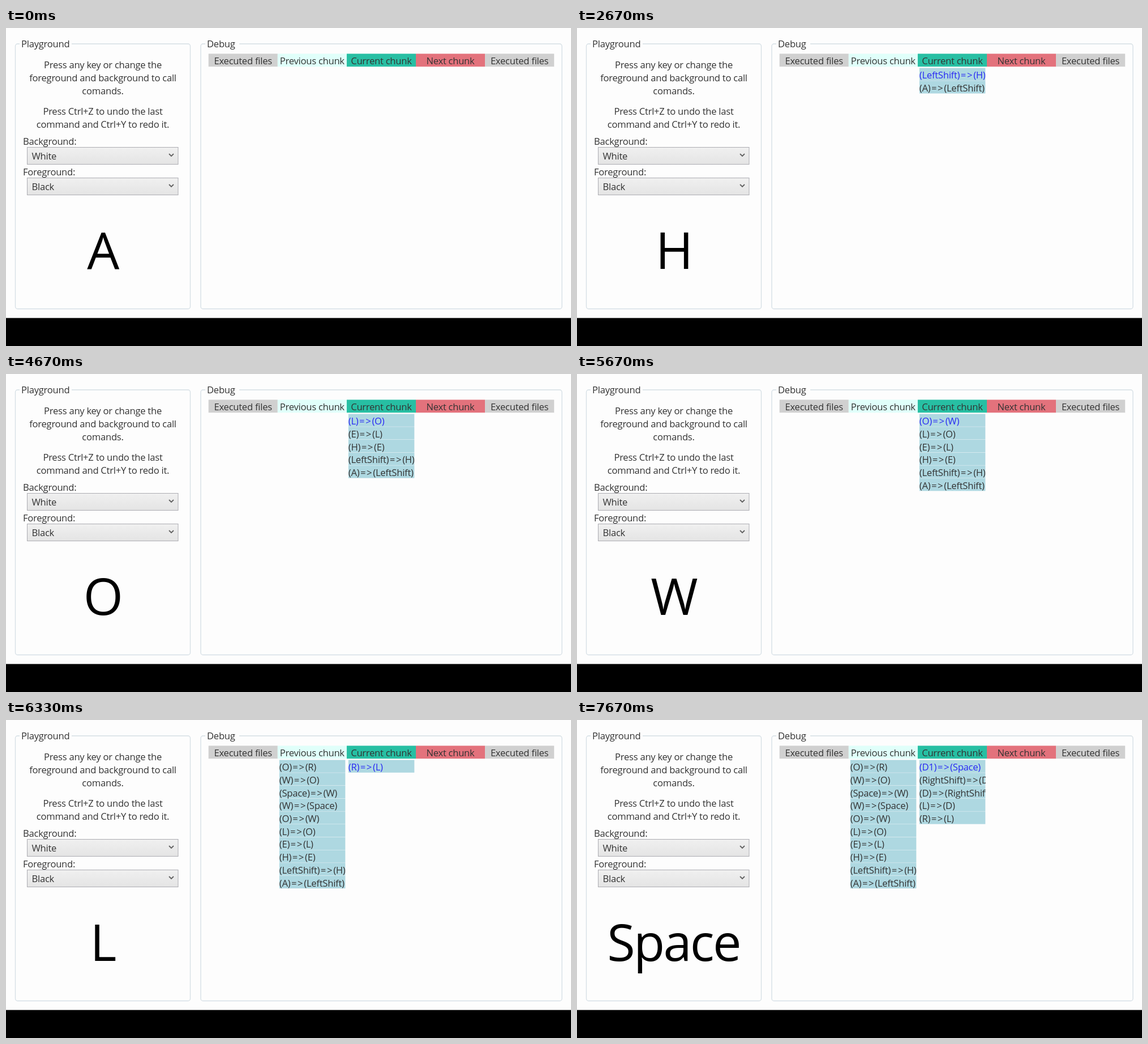
Recreate the animation shown at these times as an HTML page. Size 998 px wide and 561 px high, loop 8000 ms.

```html
<!DOCTYPE html>
<html lang="en">
<head>
<meta charset="utf-8">
<title>Command playground</title>
<style>
  html, body { margin: 0; width: 100%; height: 100%; overflow: hidden; background: #fdfdfd; }
  svg { display: block; width: 100%; height: 100%; }
  text {
    font: 16.6px "Open Sans", "Noto Sans", sans-serif;
    letter-spacing: -.015em;
    fill: #333;
  }
  .mid { text-anchor: middle; }
  .frame { fill: none; stroke: #d5dfe5; stroke-width: 1.3; }
  .gap { fill: #fdfdfd; }
  .combo { fill: url(#face); stroke: #acacb2; }
  .arrow { fill: none; stroke: #606060; stroke-width: 1.8; }
  .row { fill: #aed8e1; }
  .newest { fill: #2828f4; }
  .arrowText { letter-spacing: 1.7px; }
  #key { font-size: 90px; letter-spacing: -.03em; fill: #000; }
</style>
</head>
<body>
<svg viewBox="0 0 998 561">
  <defs>
    <linearGradient id="face" x2="0" y2="1">
      <stop stop-color="#f0f0f0"/>
      <stop offset="1" stop-color="#e4e4e4"/>
    </linearGradient>
    <clipPath id="previousClip"><rect x="482" y="68" width="118" height="420"/></clipPath>
    <clipPath id="currentClip"><rect x="604" y="68" width="118" height="420"/></clipPath>
    <clipPath id="keyClip"><rect x="22" y="320" width="298" height="160"/></clipPath>
  </defs>

  <rect width="998" height="561" fill="#fdfdfd"/>
  <rect class="frame" x="16.5" y="28" width="309" height="467.5" rx="4"/>
  <rect class="frame" x="344" y="28" width="638" height="467.5" rx="4"/>
  <rect class="gap" x="24" y="20" width="92" height="16"/>
  <rect class="gap" x="352" y="20" width="60" height="16"/>
  <text x="27" y="34">Playground</text>
  <text x="355" y="34">Debug</text>

  <g class="mid">
    <text x="171" y="71">Press any key or change the</text>
    <text x="171" y="94">foreground and background to call</text>
    <text x="171" y="116.5">comands.</text>
    <text x="171" y="153">Press Ctrl+Z to undo the last</text>
    <text x="171" y="176">command and Ctrl+Y to redo it.</text>
  </g>

  <text x="30" y="205.5">Background:</text>
  <rect class="combo" x="37.5" y="210.5" width="266.5" height="30"/>
  <text x="45.5" y="232">White</text>
  <path class="arrow" d="M288 222l4 4 4-4"/>

  <text x="30" y="259.5">Foreground:</text>
  <rect class="combo" x="37.5" y="264.5" width="266.5" height="30"/>
  <text x="45.5" y="286">Black</text>
  <path class="arrow" d="M288 276l4 4 4-4"/>

  <g clip-path="url(#keyClip)"><text id="key" y="425"></text></g>
  <g id="headers" class="mid"></g>
  <g id="previous" clip-path="url(#previousClip)"></g>
  <g id="current" clip-path="url(#currentClip)"></g>
  <rect y="511.6" width="998" height="50"/>
</svg>

<script>
const LOOP = 8000;
const CHUNK = 10;
const ROW = 22.7;
const keys = ['A', 'LeftShift', 'H', 'E', 'L', 'O', 'W', 'Space', 'W', 'O', 'R',
  'L', 'D', 'RightShift', 'D1', 'Space'];
// [time, number of commands executed by then]
const steps = [[0, 0], [2670, 2], [3670, 3], [4330, 4], [4670, 5], [5670, 6],
  [6000, 9], [6330, 11], [6670, 13], [7000, 14], [7670, 15]];
const headers = [['Executed files', '#d0d0d0'], ['Previous chunk', '#e0fffa'],
  ['Current chunk', '#27bfa3'], ['Next chunk', '#e3727c'], ['Executed files', '#d0d0d0']];

const byId = id => document.getElementById(id);

byId('headers').innerHTML = headers.map(([label, color], i) => {
  const x = 357.7 + i * 122.1;
  return `<rect x="${x}" y="45.4" width="122.1" height="22.8" fill="${color}"/>
    <text x="${x + 61}" y="64">${label}</text>`;
}).join('');

function listRows(x, from, to, highlight) {
  let rows = '';
  for (let i = to - 1; i >= from; i--) {
    const y = 70.5 + (to - 1 - i) * ROW;
    const style = highlight && i === to - 1 ? 'newest' : '';
    rows += `<rect class="row" x="${x}" y="${y}" width="116.5" height="${ROW - .4}"/>
      <text class="${style}" x="${x}" y="${y + 18.7}">(${keys[i]})<tspan class="arrowText" dx="1.5">=&gt;</tspan>(${keys[i + 1]})</text>`;
  }
  return rows;
}

function show(count) {
  const key = byId('key');
  const tooWide = keys[count].endsWith('Shift');
  key.textContent = keys[count];
  key.setAttribute('x', tooWide ? 22 : 170.5);
  key.setAttribute('text-anchor', tooWide ? 'start' : 'middle');
  const start = count > CHUNK ? CHUNK : 0;
  byId('previous').innerHTML = listRows(482.8, 0, start, false);
  byId('current').innerHTML = listRows(604.8, start, count, true);
}

let shown = -1;
function tick() {
  const time = performance.now() % LOOP;
  const count = steps.findLast(([at]) => at <= time)[1];
  if (count !== shown) show(shown = count);
  requestAnimationFrame(tick);
}
tick();
</script>
</body>
</html>
```
